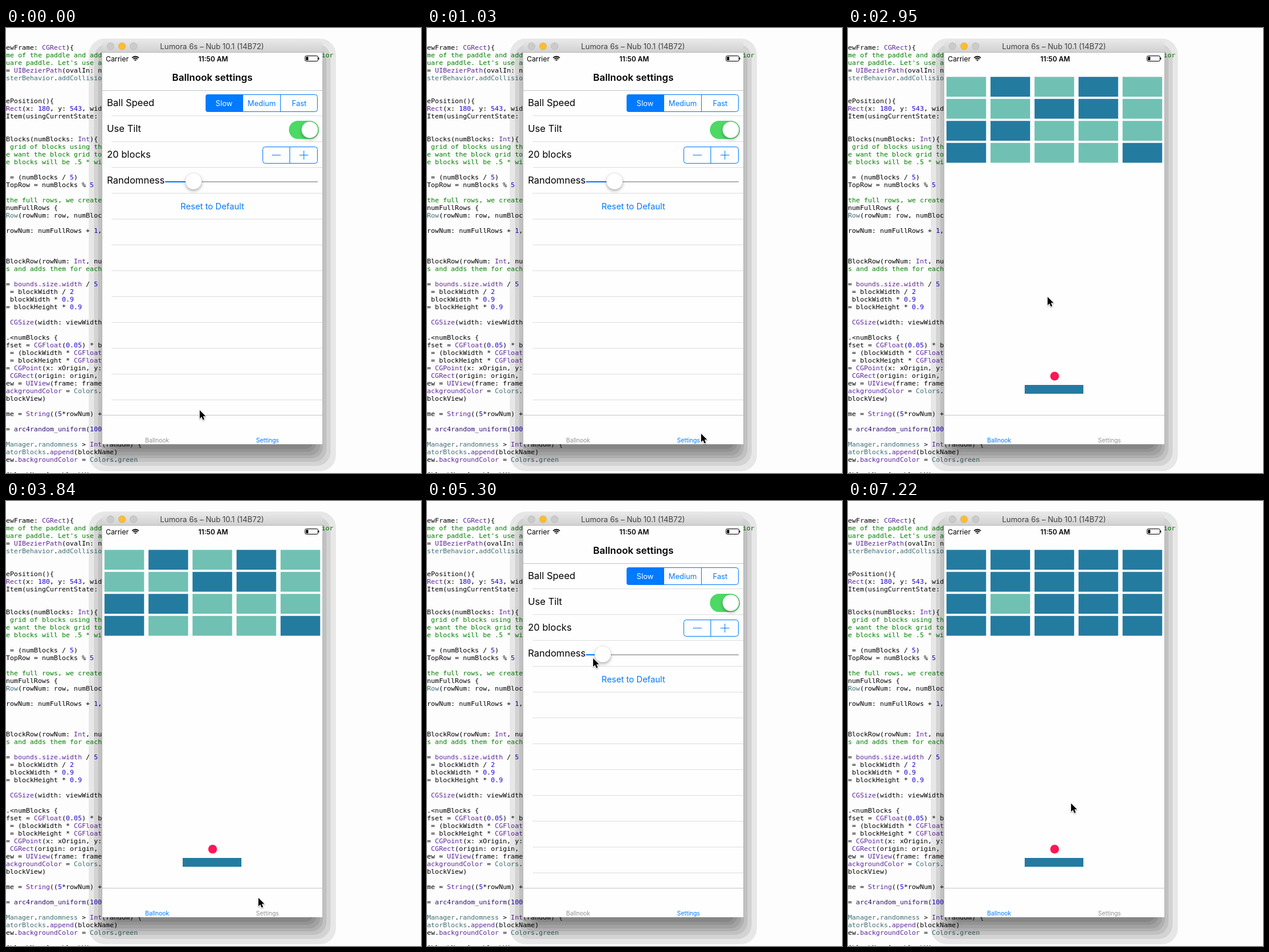
Animation of 707x758 px, one loop 8000 ms. Source, as an HTML page with a canvas:

```html
<!DOCTYPE html>
<html lang="en">
<head>
<meta charset="utf-8">
<title>Ballnook settings</title>
<style>
  html, body { margin: 0; width: 100%; height: 100%; overflow: hidden; background: #fdfdfd; }
  canvas { display: block; }
</style>
</head>
<body>
<canvas id="stage" width="707" height="758"></canvas>
<script>
const ctx = document.getElementById('stage').getContext('2d');

const LOOP = 8000;
const TICK = 147.4;
const LAST_TICK = 49;
const TINT = '#007aff', GREEN = '#70c1b3', BLUE = '#247ba0', RED = '#ff1654';
const COMMENT = '#007f00';
const WIN = { x: 164, y: 20, w: 375, h: 689 };
const SANS = 'Inter, Roboto, sans-serif';
const MONO = '11.3px "DejaVu Sans Mono", monospace';

// places the pointer visits: arrival tick, x, y
const STOPS = [
  [0, 330, 650],
  [3, 257, 696],                        // game tab
  [7, 467, 690],                        // settings tab
  [11, 319.5, 266], [14, 423.5, 272],   // drag right
  [15, 419, 298],
  [17, 251, 728], [19, 254, 691],       // game tab
  [20, 340, 457], [22, 340, 457],
  [26, 430, 675], [27, 440, 690],       // settings tab
  [30, 423.5, 268], [34, 299.5, 267],   // drag left
  [36, 283, 267],
  [39, 245, 706], [41, 253, 691],       // game tab
  [43, 341, 606], [46, 444, 590], [49, 380, 514]
];

const PAGE_FLIPS = [3, 7, 18, 28, 40];
const GREEN_MASKS = [0x24028, 0x77275, 0x00800];  // one bit per block

// one entry per editor line
const CODE = `ewFrame: CGRect){
//me of the paddle and add
//uare paddle. Let's use a
= UIBezierPath(ovalIn: n
sterBehavior.addCollisio


ePosition(){
Rect(x: 180, y: 543, wid
Item(usingCurrentState: 


Blocks(numBlocks: Int){
// grid of blocks using th
//e want the block grid to
//e blocks will be .5 * wi

 = (numBlocks / 5)
TopRow = numBlocks % 5

//the full rows, we create
numFullRows {
Row(rowNum: row, numBloc

rowNum: numFullRows + 1,



BlockRow(rowNum: Int, nu
//s and adds them for each

= bounds.size.width / 5
 = blockWidth / 2
 blockWidth * 0.9
= blockHeight * 0.9

 CGSize(width: viewWidth

.<numBlocks {
fset = CGFloat(0.05) * b
 = (blockWidth * CGFloat
 = blockHeight * CGFloat
= CGPoint(x: xOrigin, y:
 CGRect(origin: origin, 
ew = UIView(frame: frame
ackgroundColor = Colors.
blockView)

me = String((5*rowNum) +

= arc4random_uniform(100

Manager.randomness > Int(random) {
atorBlocks.append(blockName)
ew.backgroundColor = Colors.green

[blockName] = blockView`.split('\n');

const TOKENS = /bounds\.size\.width|\d+\.\d+|\w+|\W/g;
const SYNTAX = [
  [/^\d+(\.\d+)?$/, '#1c00cf'],
  [/^(CG\w+|UI\w+|Int|String|Rect|bounds.*|append|b?ackgroundColor)$/, '#5c2699'],
  [/^arc4random_uniform$/, '#2e0d6e'],
  [/^(Manager|randomness|sterBehavior|addCollisio|atorBlocks|Colors|green|Row)$/, '#3f6e74']
];

const clamp = (v, lo, hi) => Math.max(lo, Math.min(hi, v));
const smooth = p => p * p * (3 - 2 * p);

function pointerAt(tick) {
  const next = STOPS.findIndex(s => s[0] > tick);
  if (next < 0) return STOPS[STOPS.length - 1].slice(1);
  const [t0, x0, y0] = STOPS[next - 1], [t1, x1, y1] = STOPS[next];
  const p = smooth((tick - t0) / (t1 - t0));
  return [x0 + (x1 - x0) * p, y0 + (y1 - y0) * p];
}

// the knob follows the pointer during the two drags
function sliderAt(tick) {
  const held = tick < 30 ? clamp(tick, 11, 14) : Math.min(tick, 34);
  return pointerAt(held)[0];
}

function rect(x, y, w, h, color) {
  ctx.fillStyle = color;
  ctx.fillRect(x, y, w, h);
}

function round(x, y, w, h, r, fill) {
  ctx.beginPath();
  ctx.roundRect(x, y, w, h, r);
  if (!fill) return ctx.stroke();
  ctx.fillStyle = fill;
  ctx.fill();
}

function disc(x, y, r, color) {
  ctx.beginPath();
  ctx.arc(x, y, r, 0, Math.PI * 2);
  ctx.fillStyle = color;
  ctx.fill();
}

function text(str, x, y, size, color, align = 'left', weight = 400) {
  ctx.font = `${weight} ${size}px ${SANS}`;
  ctx.textAlign = align;
  ctx.fillStyle = color;
  ctx.fillText(str, x, y);
}

function knob(x, y) {
  ctx.save();
  ctx.shadowColor = 'rgba(0,0,0,.3)';
  ctx.shadowBlur = 5;
  ctx.shadowOffsetY = 2.5;
  disc(x, y, 14, '#fff');
  ctx.restore();
  ctx.strokeStyle = 'rgba(0,0,0,.08)';
  ctx.stroke();
}

function drawCode() {
  ctx.font = MONO;
  ctx.textAlign = 'left';
  const advance = ctx.measureText('0').width;
  CODE.forEach((line, row) => {
    const y = 37 + row * 13;
    if (line.startsWith('//')) {
      ctx.fillStyle = COMMENT;
      ctx.fillText(line.slice(2), 0, y);
      return;
    }
    let col = 0;
    for (const token of line.match(TOKENS) || []) {
      const rule = SYNTAX.find(([pattern]) => pattern.test(token));
      ctx.fillStyle = rule ? rule[1] : '#000';
      ctx.fillText(token, col * advance, y);
      col += token.length;
    }
  });
  ctx.fillStyle = COMMENT;
  ctx.fillText('ior', 537.5, 50);
}

function drawShadow() {
  for (let i = 0; i < 7; i++) {
    const inset = Math.round(9 * i ** .8);
    round(141 + inset, 18 + inset, 421 - 2 * inset, 737 - 2 * inset, 27 - inset / 3,
      'rgba(0,0,0,.085)');
  }
}

function drawWindow() {
  round(WIN.x, WIN.y, WIN.w, WIN.h, [5, 5, 0, 0], '#fefefe');
  const bar = ctx.createLinearGradient(0, 20, 0, 42);
  bar.addColorStop(0, '#e8e8e8');
  bar.addColorStop(1, '#d0d0d0');
  round(WIN.x, WIN.y, WIN.w, 22, [5, 5, 0, 0], bar);
  rect(WIN.x, 41, WIN.w, 1, '#b6b6b6');

  ['#cbcbcb', '#ffbd2e', '#cbcbcb'].forEach((color, i) => {
    disc(178 + 19.7 * i, 31, 6, color);
    ctx.strokeStyle = 'rgba(0,0,0,.1)';
    ctx.stroke();
  });
  text('Lumora 6s – Nub 10.1 (14B72)', 351, 36, 12.8, '#404040', 'center');
}

function drawStatus() {
  text('Carrier', 170, 56.5, 11.9, '#000');
  text('11:50 AM', 353, 56.5, 11.6, '#000', 'center', 600);

  ctx.strokeStyle = '#000';
  ctx.lineWidth = 1.8;
  for (const r of [8, 5, 2]) {
    ctx.beginPath();
    ctx.arc(220.5, 56.5, r, -Math.PI * .75, -Math.PI * .25);
    ctx.stroke();
  }
  ctx.lineWidth = 1;
  round(509.5, 47.5, 22, 9, 2);
  rect(511, 49, 4, 6, '#000');
  rect(532, 50.5, 1.5, 3, '#000');
}

function drawTabs(inGame) {
  rect(WIN.x, 659, WIN.w, 1, '#c6c6c6');
  text('Ballnook', 257.5, 706, 10.1, inGame ? TINT : '#929292', 'center');
  text('Settings', 445.5, 706, 10.1, inGame ? '#929292' : TINT, 'center');
}

function drawSettings(slider) {
  text('Ballnook settings', 351.5, 90, 16.5, '#000', 'center', 600);
  rect(WIN.x, 106, WIN.w, 1, '#c4c4c4');
  for (let y = 149; y < 650; y += 44) rect(180, y, 359, 1, '#dedee0');

  ['Ball Speed', 'Use Tilt', '20 blocks', 'Randomness'].forEach((label, i) =>
    text(label, 172, 133 + 44 * i, 16.1, '#000'));
  text('Reset to Default', 351.5, 309, 14.4, TINT, 'center');

  // speed selector
  round(340, 113, 64, 30, [4, 0, 0, 4], TINT);
  ctx.strokeStyle = TINT;
  round(340.5, 113.5, 190, 29, 4);
  ['Slow', 'Medium', 'Fast'].forEach((label, i) => {
    if (i) rect(339 + 64 * i, 113, 1, 30, TINT);
    text(label, 371.5 + 64 * i, 132.5, 12.6, i ? TINT : '#fff', 'center');
  });

  // tilt switch
  round(482, 158, 51, 31, 15.5, '#4cd964');
  knob(517.5, 173.5);

  // block stepper
  ctx.strokeStyle = TINT;
  round(437.5, 202.5, 93, 28, 4);
  rect(483, 202, 1, 29, TINT);
  rect(453, 216, 15, 1, TINT);
  rect(500, 216, 15, 1, TINT);
  rect(507, 209, 1, 15, TINT);

  rect(271, 261, 260, 2, '#b3b3b3');
  rect(271, 261, slider - 271, 2, TINT);
  knob(slider, 261);
}

function drawGame(greenMask) {
  for (let i = 0; i < 20; i++) {
    rect(167.75 + 75 * (i % 5), 83.25 + 37.5 * Math.floor(i / 5), 67.5, 33.75,
      greenMask >> i & 1 ? GREEN : BLUE);
  }
  disc(352, 593, 7.5, RED);
  rect(301, 608, 100, 15, BLUE);
}

function drawPointer(x, y) {
  const arrow = new Path2D('M0 0V14.2L3.2 11.2L5.6 16.6L8 15.6L5.7 10.3H10.2Z');
  ctx.save();
  ctx.translate(x, y + 1);
  ctx.lineJoin = 'round';
  ctx.lineWidth = 2;
  ctx.strokeStyle = '#fff';
  ctx.shadowColor = 'rgba(0,0,0,.35)';
  ctx.shadowBlur = 2;
  ctx.shadowOffsetY = 1;
  ctx.stroke(arrow);
  ctx.shadowColor = 'transparent';
  ctx.fillStyle = '#000';
  ctx.fill(arrow);
  ctx.restore();
}

function draw(ms) {
  const tick = Math.min(LAST_TICK, Math.floor(ms / TICK + .05));
  const flips = PAGE_FLIPS.filter(t => t <= tick).length;
  const inGame = flips % 2 === 1;
  ctx.lineWidth = 1;
  rect(0, 0, 707, 758, '#fdfdfd');
  drawCode();
  drawShadow();
  drawWindow();
  drawStatus();
  if (inGame) drawGame(GREEN_MASKS[(flips - 1) / 2]);
  else drawSettings(sliderAt(tick));
  drawTabs(inGame);
  drawPointer(...pointerAt(tick));
}

const start = performance.now();
function loop() {
  draw((performance.now() - start) % LOOP);
  requestAnimationFrame(loop);
}
loop();
</script>
</body>
</html>
```
